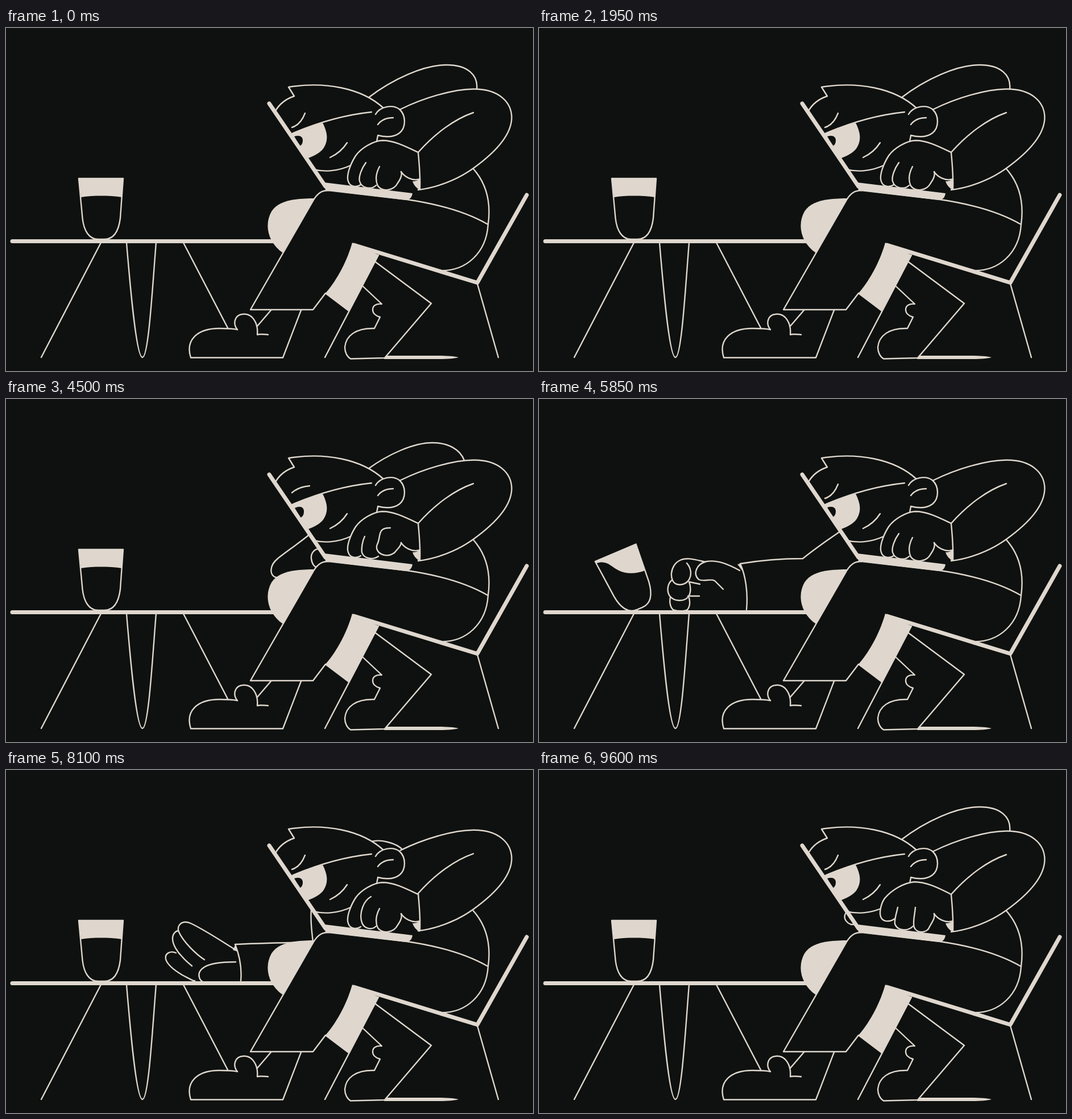
Write an HTML page that moves like this. It is 927x604 px and loops after 9.75 s.

```html
<!DOCTYPE html>
<html lang="en">
<head>
<meta charset="utf-8">
<title>Reaching for the glass</title>
<style>
  html, body { margin: 0; width: 100%; height: 100%; overflow: hidden; background: #0e110f; }
  svg { display: block; width: 100vw; height: 100vh; }
  .line { fill: none; }
  .ink { fill: #dfd7ce; stroke: none; }
  .mask { fill: #0e110f; stroke: none; }
</style>
</head>
<body>
<svg viewBox="0 0 927 604" fill="#0e110f" stroke="#dfd7ce" stroke-width="2.4" stroke-linecap="round" stroke-linejoin="round">
  <path class="line" d="M167 378L62 580M212 378C218 450 229 580 240 580C251 580 258 450 264 378M312 378L391 530"/>

  <g id="glass">
    <path d="M128 265L134.5 335C137 357 146 372 162 372L173 372C189 372 198 359 201 335L206 265Z"/>
    <path class="ink" id="foam"/>
  </g>

  <path id="shoulder"/>
  <g id="reach">
    <path/><path/><path/><path/><path/><path class="line"/><path class="ink"/>
  </g>
  <path class="line" stroke-width="7" d="M11 375.5H474"/>

  <!-- back foot and shadow -->
  <path class="ink" d="M667 577H765Q789 577.5 796 580Q786 583 760 583H665Z"/>
  <path d="M650 412L748 485L666 581L606 582.5C600 579 596 571 596 562C598 542 615 528 648 529L658 509C650 507 645 502 645 496C645 489 651 485 661 486L628 455"/>

  <!-- front shoe -->
  <path class="mask" d="M466 497L442 525L407 531C398 529 388 529 375 529C335 529 315 552 325 580H487L519 497"/>
  <path class="line" d="M466 497L442 525M407 531C398 529 388 529 375 529C337 529 315 549 325 580.5H487L519 497"/>
  <path d="M407 531C398 520 403 505 416 504C433 502 444 519 442 540C448 538 455 540 461 540"/>

  <path class="ink" d="M545 300C508 300 480 303 467 323C454 346 460 377 487 396Z"/>
  <path class="line" d="M822 248C846 275 853 310 848 346C845 395 810 430 760 427"/>

  <path class="mask" d="M463 133L563 280L700 290L730 220L650 150Z"/>

  <!-- head -->
  <path class="mask" d="M474 146C482 132 495 124 507 120L497 104C560 94 625 105 664 141L654 190L652 200L606 242C585 252 560 254 541 249Z"/>
  <path class="line" d="M474 146C482 132 495 124 507 120L497 104C560 94 625 105 664 141M503 186C545 168 595 153 643 148M654 190L652 200M541 249C560 254 585 252 606 242M570 228C583 222 593 213 600 202"/>
  <path class="ink" d="M500 187Q530 174 557 167C566 185 567 198 559 211Q552 222 529 230Z"/>
  <path class="mask" id="pupil"/>
  <path class="line" id="brow"/>

  <!-- legs and chair -->
  <path class="mask" d="M430 496L541 302C550 289 557 286 568 286L705 302C760 310 812 325 848 346L760 427L610 380C600 410 582 445 562 467L540 496Z"/>
  <path class="line" d="M848 346C812 325 760 310 705 302L568 286C557 286 550 289 542 301L430 496H540L562 467L603 498"/>
  <path class="ink" d="M609 378L656 400L603 498L562 467C584 442 601 407 609 378Z"/>
  <path class="line" d="M655 400L561 580M829 450L866 580"/>
  <path class="line" stroke-width="7" d="M612 382L829 448.5L916 294"/>

  <!-- near arm -->
  <g id="sleeve">
    <path d="M694 143C735 123 785 108 822 107.5C866 107 889.5 130 889.5 158C889 190 858 221 822 247C793 268 757 281 725 285L728 283C729 262 727 240 725 219"/>
    <path class="line" d="M725 219C755 185 790 160 822 149"/>
  </g>
  <path d="M650 152C658 138 680 134 692 143C704 154 704 175 692 185C680 194 662 191 654 189"/>
  <path class="line" d="M654 170C660 162 670 158 681 158"/>

  <!-- laptop -->
  <path class="line" stroke-width="7" d="M463 133L562 279"/>
  <path class="ink" d="M560 272L715 291C714 298 711 302 704 303L562 286Z"/>

  <g id="typing"><path/><path/><path/></g>
  <path class="line" d="M695 253C701 262 714 270 728 266"/>
  <path class="ink" d="M715 270Q722 270 728 266L728 285Q719 281 715 270Z"/>
</svg>

<script>
const LOOP = 9750, STEP = 150, CYCLE = 1950;
const $ = id => document.getElementById(id);

const lerp = (a, b, k) => a + (b - a) * k;

// Blends numbers, paths of equal structure, or lists of either.
function mix(a, b, k) {
  if (typeof a === 'number') return lerp(a, b, k);
  if (Array.isArray(a)) return a.map((v, i) => mix(v, b[i], k));
  const to = b.match(/-?[\d.]+/g);
  let i = 0;
  return a.replace(/-?[\d.]+/g, n => lerp(+n, +to[i++], k).toFixed(2));
}

function at(keys, t) {
  let i = 0;
  while (i < keys.length - 2 && t >= keys[i + 1][0]) i++;
  const [t0, a] = keys[i], [t1, b] = keys[i + 1];
  const k = Math.min(1, Math.max(0, (t - t0) / (t1 - t0)));
  return mix(a, b, k * k * (3 - 2 * k));
}

const mapPoints = (d, f) => d.replace(/(-?[\d.]+) (-?[\d.]+)/g, (_, x, y) => f(+x, +y).join(' '));
const shift = (paths, dx, dy = 0) => paths.map(d => mapPoints(d, (x, y) => [x + dx, y + dy]));

function draw(id, paths) {
  paths.forEach((d, i) => $(id).children[i].setAttribute('d', d));
}

// Far arm: sleeve, three fingers, thumb, creases, cuff
const palm = [
  'M537 246C535 265 538 285 540 303C500 304 440 305 403 307C412 330 415 350 413 371',
  'M294 302C287 304 284 312 287 321C290 333 305 349 312 356C318 362 325 367 332 372',
  'M304 283C298 283 293 289 293 297C293 308 302 321 310 329C316 336 321 340 327 345',
  'M401 315C374 298 350 282 325 270C308 263 300 275 304 285C312 303 335 325 349 334',
  'M404 338C384 338 360 340 349 347C341 352 338 358 340 365C341 369 343 371 345 372L345 372',
  'M327 345L327 345M332 371L332 371',
  'M404 307L399 317L408 320Z'
];
const drummed = 'M299 322C290 318 279 322 281 333C284 344 300 355 310 361C318 365 325 369 332 372';
const fist = [
  'M530 233C505 250 480 268 464 281C430 281 390 284 354 290C363 310 368 340 365 371',
  'M231 349C229 358 231 367 236 371C244 374 256 374 261 371C265 366 266 358 264 350',
  'M235 318C226 324 224 338 230 347C238 357 255 357 262 349C268 342 267 330 264 322',
  'M293 287C275 283 260 278 248 284C229 293 229 322 242 326C262 332 276 308 260 289',
  'M353 302C335 292 315 283 295 286C277 290 270 308 281 318C290 322 302 316 309 320L324 335',
  'M264 322L283 326M262 347L282 347',
  'M349 291L355 290L358 303Z'
];
const folded = palm.map(d => mapPoints(d, (x, y) => [575 + (x - 345) * .2, 305 + (y - 330) * .2]));
folded[0] = 'M532 240C515 254 490 271 478 281C463 293 463 311 475 314C495 318 520 315 545 312';
folded[3] = 'M549 264C541 265 536 273 537 281C538 290 543 298 549 296C551 296 552 294 554 292';
const hidden = shift(folded, 92);
const fingertip = [...hidden];
fingertip[3] = 'M541 250C537 254 537 260 539 264C542 269 546 271 549 272C551 272 552 272 554 272';
const grab = shift(palm, -82);
grab[0] = 'M530 233C505 248 470 262 440 274C400 282 350 296 321 307C330 330 333 350 331 371';

const reachKeys = [
  [0, hidden], [4200, hidden], [4500, folded], [5250, grab], [5400, grab], [5850, fist],
  [6150, fist], [6900, palm], [8550, palm], [9300, folded], [9600, fingertip], [9750, hidden]
];

const high = 'M637 123C680 90 735 65 775 65C812 65 831 83 828 108';
const mid = 'M637 123C673 97 717 77 750 77C778 77 799 89 806 108';
const low = 'M642 126C650 124 662 124 672 127C684 130 692 134 698 141';
const gone = 'M652 140C658 140 665 140 670 142C675 144 680 147 684 150';
const shoulderKeys = [
  [0, high], [4200, high], [4500, mid], [5100, gone], [6300, gone],
  [6900, low], [8550, low], [9300, mid], [9600, high], [9750, high]
];

// Typing hand: back with first finger, middle finger, last finger
const rest = [
  'M725 219C702 208 682 198 662 198C645 199 624 212 615 225C606 239 598 260 602 270C605 280 617 281 624 276',
  'M633 237C625 248 620 262 622 270C626 283 643 285 651 277',
  'M657 244C651 255 649 268 654 278C662 289 682 287 689 273C694 266 697 258 695 253'
];
const middleUp = [rest[0], 'M642 223C629 230 622 250 625 265C628 281 644 282 651 275', rest[2]];
const lastUp = [
  rest[0],
  'M631 242C627 250 625 262 626 270C629 281 645 284 655 277',
  'M676 227C652 226 660 243 653 256C647 270 668 283 684 270C688 264 695 260 695 253'
];
const firstUp = [
  'M725 219C700 206 680 197 660 197C640 199 620 212 608 226C601 236 597 255 603 262C609 269 621 266 627 261',
  'M631 242C629 252 625 262 626 271C630 283 648 285 658 275',
  'M662 242C661 255 657 268 660 277C664 288 683 288 687 276C691 268 697 262 695 253'
];
const typingKeys = [
  [0, rest], [300, middleUp], [600, lastUp], [900, rest],
  [1200, middleUp], [1500, lastUp], [1800, firstUp], [CYCLE, rest]
];

const tiltKeys = [
  [0, 0], [5250, 0], [5400, .35], [5550, .8], [5700, 1.02], [5850, 1], [6150, .9],
  [6300, .65], [6450, .25], [6600, -.08], [6750, .04], [6900, 0], [9750, 0]
];
const calm = 'M128 265L206 265L204 298C192 296 180 295.5 167 295.5C155 295.5 143 296 132 298Z';
const slosh = 'M128 265L206 265L203 314C185 314 168 306 160 296C150 284 148 270 129 269Z';

// Brow and pupil
const frown = ['M503 175C513 172 521 163 526 150', 'M507 191C516 188 522 191 522 198C522 203 520 206 517 208Z'];
const alert = ['M503 165C511 158 521 154 534 153', 'M508 192C518 187 524 191 524 198C524 204 522 207 518 209Z'];
const faceKeys = [[0, frown], [2850, frown], [3150, alert], [4950, alert], [5400, frown], [9750, frown]];

function render(t) {
  const phase = t % CYCLE;
  const bob = phase < 600 ? -1.7 * Math.sin(phase / 600 * Math.PI) : 0;
  const tilt = at(tiltKeys, t);

  const reach = at(reachKeys, t);
  if (t >= 6900 && t <= 8550) {
    const drum = .5 + .5 * Math.cos((t - 8100) / 700 * 2 * Math.PI);
    reach[1] = mix(reach[1], drummed, drum);
  }
  draw('reach', reach);
  draw('typing', at(typingKeys, phase));

  $('shoulder').setAttribute('d', at(shoulderKeys, t));
  $('sleeve').setAttribute('transform', `translate(0 ${bob})`);
  $('glass').setAttribute('transform', `translate(${10 * tilt} 0) rotate(${-23 * tilt} 160 372)`);
  $('foam').setAttribute('d', mix(calm, slosh, tilt));

  const [brow, pupil] = at(faceKeys, t);
  $('brow').setAttribute('d', brow);
  $('pupil').setAttribute('d', pupil);
}

const start = performance.now();
function tick() {
  const t = (performance.now() - start) % LOOP;
  render(Math.floor(t / STEP) * STEP);
  requestAnimationFrame(tick);
}
tick();
</script>
</body>
</html>
```
